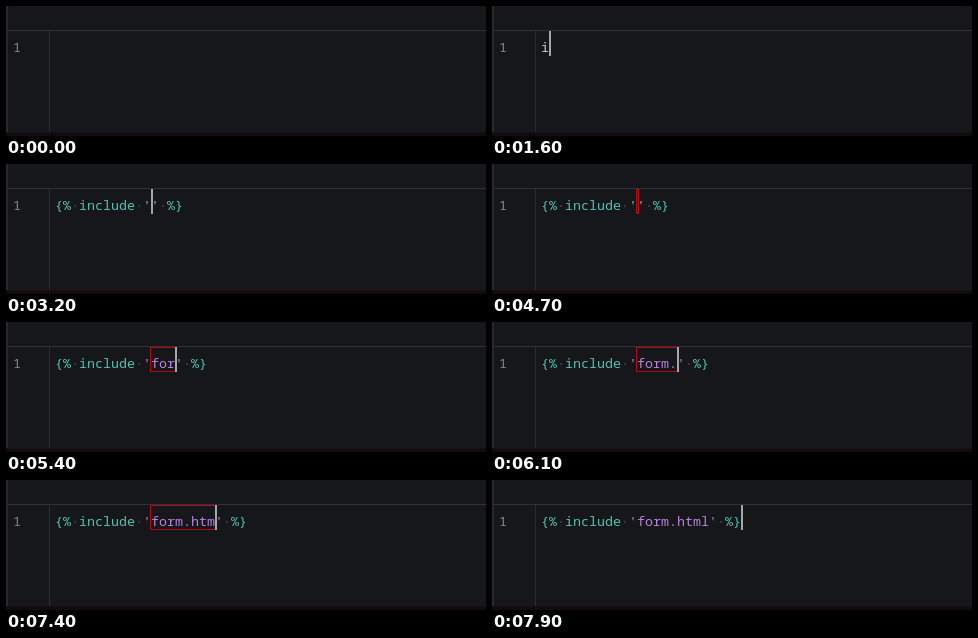
Recreate the animation shown at these times as an HTML page. Size 480 px wide and 130 px high, loop 8 s.

```html
<!DOCTYPE html>
<html lang="en">
<head>
<meta charset="utf-8">
<title>Snippet typing</title>
<style>
html, body { margin: 0; width: 100%; height: 100%; overflow: hidden; background: #16171b; }
svg { display: block; }
text { font: 13.333px "Noto Sans Mono", "DejaVu Sans Mono", monospace; white-space: pre; }
</style>
</head>
<body>
<svg width="480" height="130" viewBox="0 0 480 130">
  <rect width="480" height="130" fill="#16171b"/>
  <rect width="2" height="130" fill="#29292c"/>
  <rect x="2" y="24" width="478" height="1" fill="#313235"/>
  <rect x="43" y="25" width="1" height="102" fill="#2c2d30"/>
  <rect y="126" width="480" height="1" fill="#131117"/>
  <rect y="127" width="480" height="3" fill="#14090f"/>
  <text x="7" y="46" fill="#85868a">1</text>
  <text id="plain" x="49" y="46" fill="#c6c8cb"></text>
  <g id="tag">
    <text x="49" y="46" fill="#4fc3b0">{%</text>
    <text x="73" y="46" fill="#4fc3b0">include</text>
    <text id="str" x="137" y="46"></text>
    <text id="end" y="46" fill="#4fc3b0">%}</text>
    <g fill="#34363a">
      <rect x="68" y="41" width="2" height="2"/>
      <rect x="132" y="41" width="2" height="2"/>
      <rect id="dot" y="41" width="2" height="2"/>
    </g>
  </g>
  <rect id="box" x="144.5" y="25.5" height="24" fill="none" stroke="#b10a10"/>
  <rect id="caret" y="25" width="2" height="25" fill="#a5a6a8"/>
</svg>
<script>
const LOOP = 8000, LEFT = 49, CELL = 8, OPEN = 12;
const WORD = 'include', FILE = 'form.html';
const typeWord = [1600, 1800, 2000, 2300, 2600, 2800, 2900];
const typeFile = [5000, 5200, 5400, 5600, 6000, 6700, 6900, 7400, 7600];
const EXPAND = 3200, MARK = 4200, LEAVE = 7900;
const caretOff = [[0, 700], [3700, 4200], [4700, 5000]];

const el = id => document.getElementById(id);
const [plain, tag, str, end, dot, box, caret] =
  ['plain', 'tag', 'str', 'end', 'dot', 'box', 'caret'].map(el);
const count = (times, t) => times.filter(s => s <= t).length;
const col = n => LEFT + n * CELL;
const show = (node, on) => node.setAttribute('visibility', on ? 'visible' : 'hidden');

function draw(t) {
  const open = t >= EXPAND;
  const typed = count(typeWord, t), n = count(typeFile, t);
  const after = OPEN + n + 1;

  plain.textContent = open ? '' : WORD.slice(0, typed);
  show(tag, open);
  str.textContent = "'" + FILE.slice(0, n) + "'";
  str.setAttribute('fill', n ? '#b982dc' : '#b3a9c0');
  end.setAttribute('x', col(after + 1));
  dot.setAttribute('x', col(after) + 3);

  show(box, t >= MARK && t < LEAVE);
  box.setAttribute('width', n * CELL + 2);

  const at = !open ? typed : t < LEAVE ? OPEN + n : after + 3;
  caret.setAttribute('x', col(at));
  show(caret, !caretOff.some(([a, b]) => t >= a && t < b));
}

const start = performance.now();
function tick() {
  draw((performance.now() - start) % LOOP);
  requestAnimationFrame(tick);
}
draw(0);
requestAnimationFrame(tick);
</script>
</body>
</html>
```
